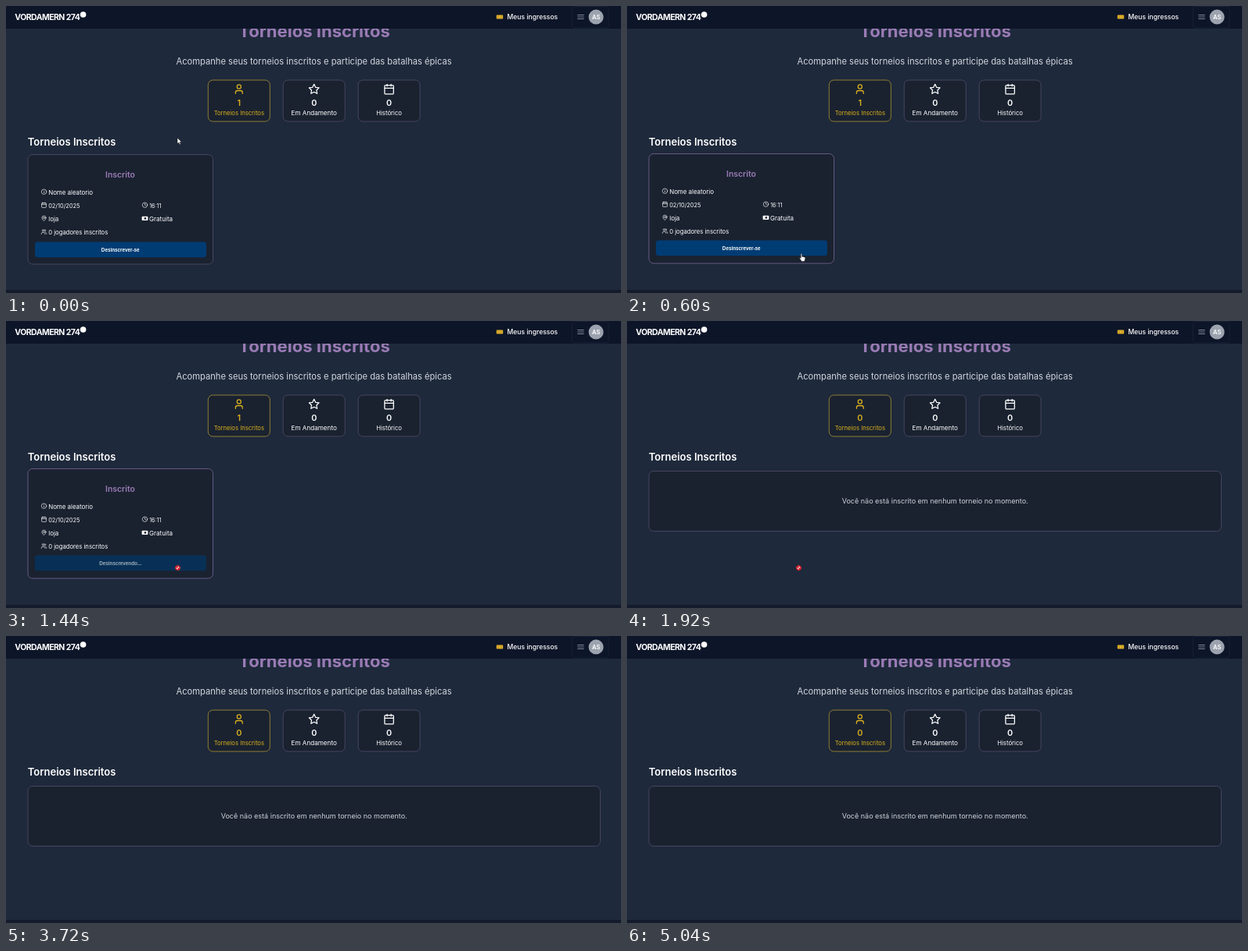
Recreate the animation shown at these times as an HTML page. Size 786 px wide and 368 px high, loop 5160 ms.

```html
<!DOCTYPE html>
<html lang="pt">
<head>
<meta charset="utf-8">
<title>Torneios Inscritos</title>
<style>
  html, body { margin: 0; width: 100%; height: 100%; overflow: hidden; background: #1e293b; }
  svg { display: block; width: 786px; height: 368px; font-family: Inter, "Open Sans", sans-serif; fill: #fff; }
  .mid { text-anchor: middle; }
  .semi { font-weight: 600; }
  .bold { font-weight: 700; }
  .purple { fill: #9a7bb5; }
  .panel { fill: #1a2230; stroke: #464560; stroke-width: 1; }
  .line { fill: none; stroke: #fff; stroke-width: 2; stroke-linecap: round; stroke-linejoin: round; }
  .gold { fill: #d9b01c; }
  .gold .line { stroke: #d9b01c; }
  .gold .panel { stroke: #8f7c35; }
  .btn { font: 700 6.3px "Liberation Sans", Arial, sans-serif; }
</style>
</head>
<body>
<svg viewBox="0 0 786 368">
  <defs>
    <g id="user"><circle cx="12" cy="7" r="4"/><path d="M19 21v-2a4 4 0 0 0-4-4H9a4 4 0 0 0-4 4v2"/></g>
    <path id="star" d="M12 2l3.1 6.3 6.9 1-5 4.9 1.2 6.8-6.2-3.2L5.8 21 7 14.2 2 9.3l6.9-1z"/>
    <g id="calendar"><rect x="3" y="4" width="18" height="18" rx="2"/><path d="M16 2v4M8 2v4M3 10h18"/></g>
    <g id="info"><circle cx="12" cy="12" r="10"/><path d="M12 16v-4M12 8h.01"/></g>
    <g id="clock"><circle cx="12" cy="12" r="10"/><path d="M12 6v6l4 2"/></g>
    <g id="pin"><path d="M20 10c0 6-8 12-8 12s-8-6-8-12a8 8 0 0 1 16 0z"/><circle cx="12" cy="10" r="3"/></g>
    <g id="users"><circle cx="9" cy="7" r="4"/><path d="M16 21v-2a4 4 0 0 0-4-4H6a4 4 0 0 0-4 4v2M22 21v-2a4 4 0 0 0-3-3.9M16 3.1a4 4 0 0 1 0 7.8"/></g>
  </defs>

  <rect width="786" height="368" fill="#1e293b"/>
  <rect y="364" width="786" height="4" fill="#131b2c"/>

  <text class="mid bold purple" x="394" y="40.4" font-size="22.05">Torneios Inscritos</text>
  <text class="mid" x="393.6" y="75" font-size="11.17" fill="#d3d8df">Acompanhe seus torneios inscritos e participe das batalhas épicas</text>

  <rect width="786" height="29" fill="#0d1528"/>
  <text class="bold" x="11.3" y="17.8" font-size="10.5" letter-spacing="-.55">VORDAMERN 274</text>
  <circle cx="98.6" cy="11" r="3.8"/>
  <g fill="#e0b22c">
    <rect x="626.8" y="11.6" width="8.4" height="5" rx=".8"/>
    <path d="M629 12.6v3M633 12.6v3" stroke="#a87c18" stroke-width=".7"/>
  </g>
  <text x="640.5" y="17" font-size="8.57" font-weight="500">Meus ingressos</text>
  <rect x="723.5" y=".5" width="46.5" height="27.5" rx="3" fill="none" stroke="#172136"/>
  <path d="M730.3 11.5h8.4M730.3 14h8.4M730.3 16.500h8.4" stroke="#8a92a0" stroke-width=".9"/>
  <circle cx="754.1" cy="14.1" r="9.5" fill="#9ca3af"/>
  <text class="mid semi" x="754.2" y="16.8" font-size="7.5">AS</text>

  <g id="stats"></g>
  <text class="semi" x="27.8" y="178.5" font-size="13">Torneios Inscritos</text>

  <g id="card">
    <rect id="frame" class="panel" x="28" y="190.5" width="236.5" height="140.5" rx="6"/>
    <text class="mid semi purple" x="146" y="220" font-size="10.4">Inscrito</text>
    <g id="rows"></g>
    <g id="button">
      <rect id="fill" x="37" y="302.5" width="219" height="19.7" rx="3.5"/>
      <text id="label" class="mid btn" x="146.2" y="314.8"></text>
    </g>
  </g>

  <g id="empty">
    <rect class="panel" x="28" y="192.5" width="731.5" height="77" rx="6"/>
    <text class="mid" x="393.7" y="234.2" font-size="9.02" fill="#cfd3d9">Você não está inscrito em nenhum torneio no momento.</text>
  </g>

  <path id="arrow" d="M0 0v7.6l1.800-1.600 1.200 2.700 1.300-.6-1.200-2.600h2.300z" stroke="#111" stroke-width=".5"/>
  <path id="hand" d="M-.8.7c0-1 1.500-1 1.500 0v3l3 .7c.8.2 1.200.7 1.100 1.500l-.5 2.500-.7 1.600H.3L-2.300 6.300c-.5-.8.3-1.500 1-.9l.5.5z" stroke="#111" stroke-width=".5"/>
  <g id="denied">
    <circle r="3" fill="#fff"/>
    <circle r="2.6" fill="none" stroke="#cc1420" stroke-width="1.5"/>
    <path d="M-1.900-1.900l3.800 3.800" stroke="#cc1420" stroke-width="1.300"/>
  </g>
</svg>
<script>
const LOOP = 5160, STEP = 120;
const BUSY = 1320, DONE = 1920, LEAVE = 3720;
const el = id => document.getElementById(id);
const clamp = v => Math.min(1, Math.max(0, v));
const ease = v => { v = clamp(v); return v * v * (3 - 2 * v); };
const mix = (a, b, k) => a + (b - a) * k;

const icon = (name, x, y, size) =>
  `<use href="#${name}" class="line" transform="translate(${x - size / 2} ${y - size / 2}) scale(${size / 24})"/>`;

const stat = (x, name, label, size, cls) => `<g class="${cls}">
  <rect class="panel" x="${x - 39.5}" y="95" width="79" height="53" rx="6"/>
  ${icon(name, x, 106.6, 15.2)}
  <text class="mid semi count" x="${x}" y="128.1" font-size="10.8">0</text>
  <text class="mid" x="${x}" y="140.4" font-size="${size}">${label}</text></g>`;

const row = (x, y, name, label, size) =>
  icon(name, x, y, 7.7) + `<text x="${x + 5.7}" y="${y + 3.6}" font-size="${size}">${label}</text>`;

el('stats').innerHTML =
  stat(297.8, 'user', 'Torneios Inscritos', 7.65, 'gold') +
  stat(393.7, 'star', 'Em Andamento', 8.15, '') +
  stat(489.6, 'calendar', 'Histórico', 7.75, '');

el('rows').innerHTML =
  row(48.5, 238.2, 'info', 'Nome aleatorio', 7.9) +
  row(48.5, 255.2, 'calendar', '02/10/2025', 7.4) +
  row(48.5, 272.3, 'pin', 'loja', 8) +
  row(48.5, 289.5, 'users', '0 jogadores inscritos', 7.7) +
  row(177.5, 255.2, 'clock', '16:11', 7.1) +
  `<rect x="173.6" y="269.8" width="7.8" height="5.2" rx="1"/>
   <circle cx="177.9" cy="272.4" r="1.3" fill="#1a2230"/>
   <text x="183" y="275.9" font-size="8.05">Gratuita</text>`;

const count = document.querySelector('.gold .count');

function show(id, on) { el(id).style.display = on ? '' : 'none'; }

function place(id, x, y) { el(id).setAttribute('transform', `translate(${x} ${y})`); }

// Curved approach to the button, then a small drift before the click.
function pointer(t) {
  if (t <= 600) {
    const k = ease(t / 600), a = (1 - k) ** 2, b = 2 * k * (1 - k), c = k * k;
    return [219 * a + 272 * b + 223 * c, 169 * a + 246 * b + 317.5 * c];
  }
  const k = ease((t - 600) / 600);
  return [mix(223, 219.5, k), mix(317.5, 316.5, k)];
}

function draw(time) {
  const t = Math.floor((time % LOOP) / STEP) * STEP;
  const busy = t >= BUSY, done = t >= DONE;
  const [x, y] = pointer(t);
  const onButton = y > 301;

  const lift = ease((t - 180) / 240), press = ease((t - 420) / 180);
  place('card', 0, -lift);
  place('button', 0, -press * 0.9);
  el('frame').style.stroke = `rgb(${mix(70, 102, lift)},${mix(69, 88, lift)},${mix(96, 130, lift)})`;

  const dim = busy ? clamp((t - BUSY + 60) / 150) : 0;
  el('fill').setAttribute('fill', `rgb(${mix(0, 8, dim)},${mix(60, 48, dim)},${mix(116, 86, dim)})`);
  el('label').setAttribute('fill-opacity', mix(1, 0.62, dim));
  el('label').textContent = busy ? 'Desinscrevendo...' : 'Desinscrever-se';
  count.textContent = done ? '0' : '1';

  show('card', !done);
  show('empty', done);
  show('arrow', !busy && !onButton);
  show('hand', !busy && onButton);
  show('denied', busy && t < LEAVE);
  place('arrow', x, y);
  place('hand', x, y);
  place('denied', x, y);
}

let start;
function tick(now) {
  start ??= now;
  draw(now - start);
  requestAnimationFrame(tick);
}
draw(0);
requestAnimationFrame(tick);
</script>
</body>
</html>
```
